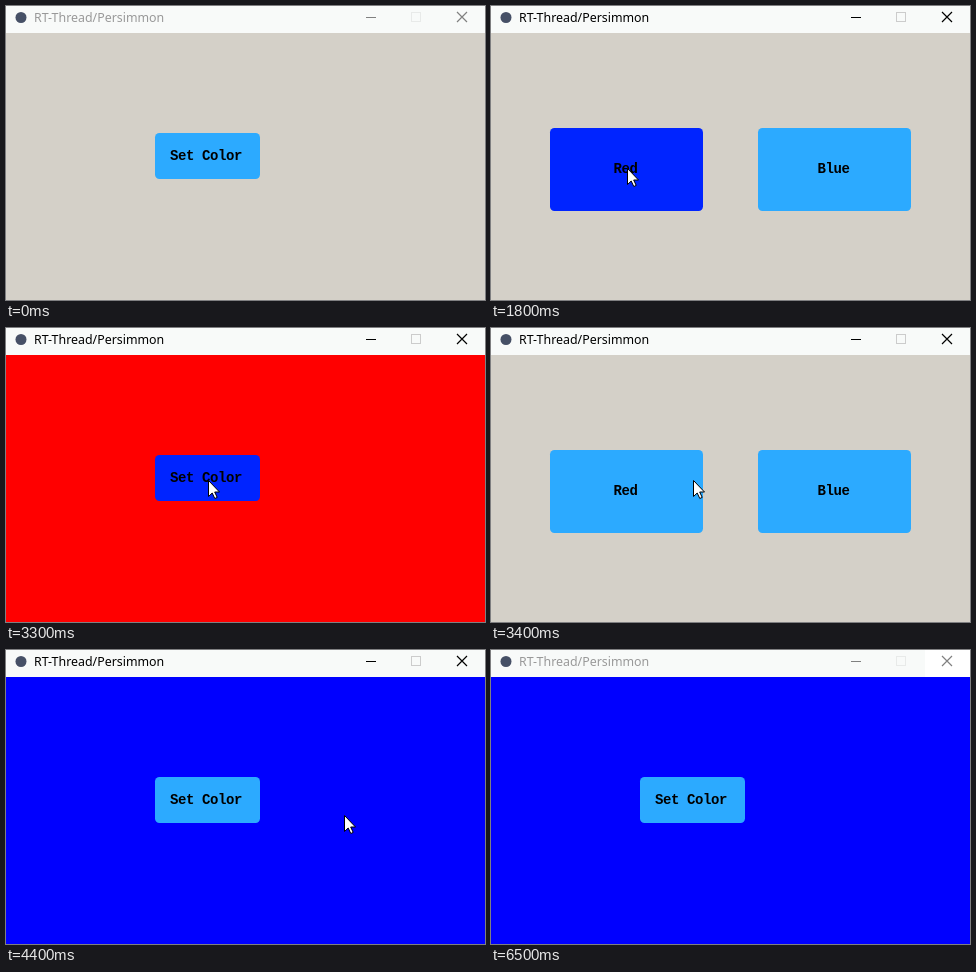
An HTML page that plays this animation: 479x294 px, repeating every 6.6 s.

```html
<!DOCTYPE html>
<html lang="en">
<head>
<meta charset="utf-8">
<title>Set Color</title>
<style>
  html, body { margin: 0; width: 100%; height: 100%; overflow: hidden; }
  svg { display: block; width: 479px; height: 294px; }
  .title { font: 12.4px "Noto Sans", "Open Sans", sans-serif; }
  .label { font: bold 14px "Liberation Mono", "DejaVu Sans Mono", monospace; letter-spacing: -.4px; }
</style>
</head>
<body>
<svg viewBox="0 0 479 294">
  <rect id="back" width="479" height="294"/>
  <rect width="479" height="27" fill="#f8faf9"/>
  <rect id="hover" x="434" width="45" height="27" fill="#fff"/>
  <circle cx="15" cy="11.5" r="5.5" fill="#465066"/>
  <text id="title" class="title" x="28" y="16">RT-Thread/Persimmon</text>
  <g id="glyphs" fill="none">
    <path d="M360 11.5h10" shape-rendering="crispEdges"/>
    <path d="M451 6l10 10M461 6l-10 10" stroke-width="1.2"/>
  </g>
  <rect id="max" x="405.5" y="6.5" width="9" height="9" fill="none"/>
  <g id="home">
    <rect id="set" x="149" y="127" width="105" height="46" rx="4.5"/>
    <text class="label" x="164" y="154">Set Color</text>
  </g>
  <g id="picker">
    <rect id="red" x="59" y="122" width="153" height="83" rx="4.5"/>
    <text class="label" x="122.5" y="167">Red</text>
    <rect id="blue" x="267" y="122" width="153" height="83" rx="4.5"/>
    <text class="label" x="326.5" y="167">Blue</text>
  </g>
  <path id="cursor" d="M.5 .5V16.5L4.2 13L6.8 18.5L9.2 17.4L6.7 12H11.5Z" fill="#fff" stroke="#000"/>
</svg>
<script>
  const LOOP = 6600, STEP = 100;
  const IDLE = '#2caaff', PRESSED = '#0024ff';

  // Each button opens a page with its own background
  const leadsTo = {
    set: ['picker', '#d4d0c8'],
    red: ['home', '#f00'],
    blue: ['home', '#00f']
  };
  const taps = [
    { button: 'set', down: 1000, up: 1100 },
    { button: 'red', down: 1800, up: 2000 },
    { button: 'set', down: 3300, up: 3400 },
    { button: 'blue', down: 4300, up: 4400 }
  ];

  const smooth = k => k * k * (3 - 2 * k);
  const speedUp = k => k ** 1.9;

  // Pointer glides; the last one swings around the bend point
  const origin = [284, 36];
  const glides = [
    { from: 300, until: 1000, to: [200, 148] },
    { from: 1400, until: 1600, to: [136, 162] },
    { from: 2300, until: 2600, to: [202, 152] },
    { from: 3600, until: 4000, to: [338, 165] },
    { from: 5400, until: 6100, to: [444, 36], bend: [72, 110], ease: speedUp }
  ];

  const $ = id => document.getElementById(id);
  const paint = (id, attr, value) => $(id).setAttribute(attr, value);
  const show = (id, on) => paint(id, 'visibility', on ? 'visible' : 'hidden');

  function pointAt(t) {
    let p = origin;
    for (const { from, until, to, bend, ease = smooth } of glides) {
      if (t <= from) break;
      const k = ease(Math.min(1, (t - from) / (until - from)));
      p = p.map((a, i) => {
        const mid = bend ? bend[i] : (a + to[i]) / 2;
        return Math.round(a * (1 - k) ** 2 + 2 * mid * k * (1 - k) + to[i] * k * k);
      });
    }
    return p;
  }

  function draw(ms) {
    const t = Math.floor(ms % LOOP / STEP) * STEP;
    const active = t >= 100 && t < 6300;
    const done = taps.filter(tap => tap.up <= t).pop();
    const held = taps.find(tap => tap.down <= t && t < tap.up);
    const [page, back] = done ? leadsTo[done.button] : ['home', '#d4d0c8'];

    paint('back', 'fill', back);
    show('home', page === 'home');
    show('picker', page === 'picker');
    for (const id in leadsTo) paint(id, 'fill', held?.button === id ? PRESSED : IDLE);

    paint('title', 'fill', active ? '#000' : '#999');
    paint('glyphs', 'stroke', active ? '#000' : '#808080');
    paint('max', 'stroke', active ? '#ccc' : '#e8eae9');
    show('hover', t >= 6200);

    show('cursor', t >= 200 && t < 6200);
    paint('cursor', 'transform', `translate(${pointAt(t)})`);
  }

  const start = performance.now();
  function tick() {
    draw(performance.now() - start);
    requestAnimationFrame(tick);
  }
  tick();
</script>
</body>
</html>
```
